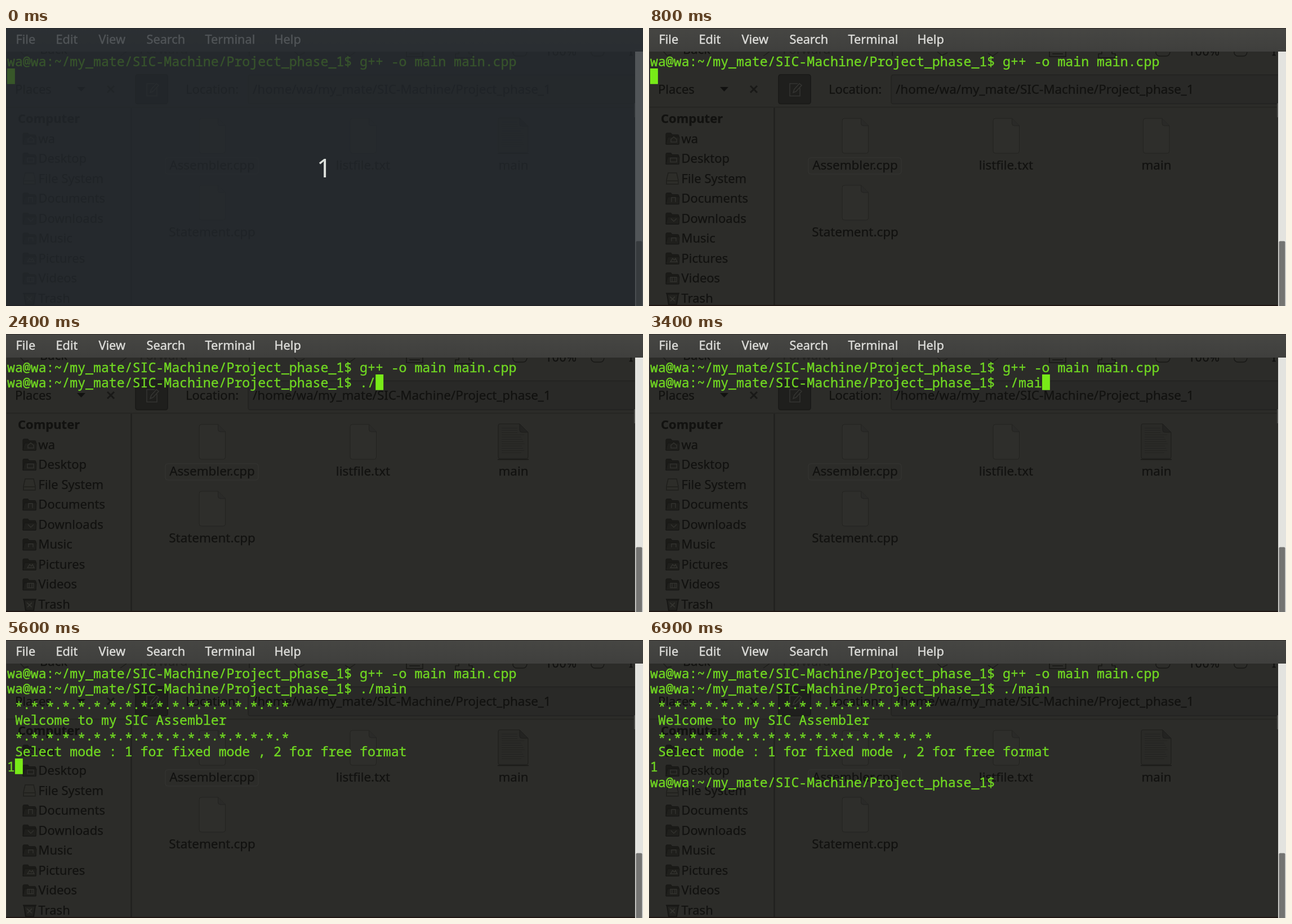
Recreate the animation shown at these times as an HTML page. Size 1131x495 px, loop 7 s.

```html
<!DOCTYPE html>
<html lang="en">
<head>
<meta charset="utf-8">
<title>Terminal session</title>
<style>
  html, body { margin: 0; width: 100%; height: 100%; overflow: hidden; background: #2c2c29; }
  svg { display: block; width: 1131px; height: 495px; }
  text { white-space: pre; font: 22px "Noto Sans", "Open Sans", sans-serif; }
  #files text { fill: #121210; stroke: #121210; stroke-width: .25px; }
  #files .bold { font-weight: 700; }
  #files .mid { text-anchor: middle; }
  #files .mid, #files .path { font-size: 22.4px; }
  #menu text { fill: #dededb; stroke: #dededb; stroke-width: .4px; font-size: 21.7px; }
  #term text { fill: #70d722; stroke: #70d722; stroke-width: .4px; font: 23.2px "Noto Sans Mono", "DejaVu Sans Mono", monospace; }
  #fade text { fill: #dde1dc; font-size: 46px; text-anchor: middle; }
</style>
</head>
<body>
<svg viewBox="0 0 1131 495">
  <defs>
    <linearGradient id="bar" x2="0" y2="1">
      <stop stop-color="#464643"/><stop offset="1" stop-color="#3f3f3d"/>
    </linearGradient>
    <g id="page">
      <path d="M.5 4q0-4 4-4H34L47 13V58q0 4-4 4H4.5q-4 0-4-4Z" fill="#2e2e2b" stroke="#232320"/>
      <path d="M34 0V9q0 4 4 4H47" fill="#2a2a28" stroke="#232320"/>
    </g>
    <g id="folder" stroke="#171715">
      <path d="M1 21V3q0-2 2-2H10l2 3H22q2 0 2 2V21Z" fill="#1b1b18"/>
      <path d="M1 21 4 8H25L24 21Z" fill="#1f1f1c"/>
    </g>
  </defs>
  <rect width="1131" height="495" fill="#2c2c29"/>
  <g id="files"></g>
  <g id="menu">
    <rect width="1131" height="42" fill="url(#bar)"/>
    <rect width="1131" height="1" fill="#2c2826"/>
  </g>
  <rect width="1" height="495" fill="#4b4a46" opacity=".6"/>
  <rect y="493" width="1117" height="2" fill="#1f1613"/>
  <rect x="1117" y="42" width="14" height="453" fill="#e3e3df"/>
  <rect x="1118.5" y="379.5" width="11" height="118" rx="2" fill="#747472"/>
  <g id="term"></g>
  <g id="fade">
    <rect width="1131" height="495" fill="#24292f" opacity=".76"/>
    <text x="565" y="266">1</text>
  </g>
</svg>
<script>
const LOOP = 7000, CELL = 13.92, ROW = 27.8, LEFT = 2;
const $ = id => document.getElementById(id);

function add(parent, tag, attrs, content = '') {
  const el = document.createElementNS('http://www.w3.org/2000/svg', tag);
  for (const key in attrs) el.setAttribute(key, attrs[key]);
  el.textContent = content;
  return parent.appendChild(el);
}
const files = $('files'), term = $('term');
const label = (x, y, s, cls = '') => add(files, 'text', { x, y, class: cls }, s);
const shape = (d, stroke, fill = 'none', width = 1.5) =>
  add(files, 'path', { d, stroke, fill, 'stroke-width': width });
const use = (id, x, y) => add(files, 'use', { href: '#' + id, x, y });

// Toolbar, mostly covered by the menu bar
shape('M24 40 32 49 40 47M203 50 214 42M432 40V50M512 42 520 49 530 44M602 45 610 50 620 43', '#1d1d1b');
shape('M711 38V51H740V38M716 46H735M804 38V46H798V53H828V46H822V38', '#171715');
shape('M900 40V45Q902 50 907 50H918Q924 50 925 43M1039 40V45Q1041 50 1046 50H1055Q1061 50 1062 43', '#181816');
label(60, 46, 'Back');
label(237, 46, 'Forward').setAttribute('opacity', '.4');
label(957, 49, '100%');
label(1106, 49, 'I');

// Panel edges and location bar
shape('M0 141H1117', '#242422');
shape('M222.5 142V493', '#222220', 'none', 3);
shape('M1117 83.5H434Q430 83.5 430 88V131Q430 135 434 135H1117', '#222220', '#292927');
shape('M234 83H283Q287 83 287 87V131Q287 135 283 135H234Q230 135 230 131V87Q230 83 234 83Z', '#191917', '#1f1f1d');
shape('M264 99H250V121H268V107M256 115 258 109 267 99 271 102 261 113Z', '#353532');
shape('M1116 134V159', '#4b4b48', 'none', 2);
label(16, 117, 'Places');
shape('M126 105H141L133.5 113Z', 'none', '#111110');
shape('M180 103 192 115M192 103 180 115', '#191917', 'none', 3);
label(319, 117, 'Location:');
label(438, 117, '/home/wa/my_mate/SIC-Machine/Project_phase_1', 'path');

// Sidebar
const glyphs = {
  wa: 'M10 17V12L15 8 20 12V17Z', Desktop: 'M9 10H20V17H9Z', Documents: 'M11 17V9H18V17',
  Downloads: 'M10 11 15 16 20 11', Music: 'M11 16V10H19V16', Pictures: 'M9 17 13 11 16 14 18 11 21 17Z',
  Videos: 'M9 9H20V17H9ZM12 9V17M17 9V17'
};
label(21, 169, 'Computer', 'bold');
['wa', 'Desktop', 'File System', 'Documents', 'Downloads', 'Music', 'Pictures', 'Videos', 'Trash'].forEach((name, i) => {
  const y = 186 + 35.55 * i;
  label(57.5, y + 18.5, name);
  if (glyphs[name]) {
    use('folder', 29, y);
    shape(glyphs[name], '#32322e').setAttribute('transform', `translate(29 ${y})`);
  } else if (name === 'Trash') {
    shape(`M32 ${y + 3}H52L49 ${y + 22}H35ZM30 ${y + 2}H54`, '#171715', '#22221f', 2);
    shape(`M37 ${y + 8} 46 ${y + 16}M46 ${y + 8} 38 ${y + 16}`, '#363632');
  } else {
    shape(`M34 ${y + 1}H49L52 ${y + 14}V${y + 21}H31V${y + 14}Z`, '#1f1f1c', '#2d2d29');
    shape(`M31 ${y + 15}H52`, '#1f1f1c');
  }
});

// File icons
shape('M287 231H444Q448 231 448 235V256Q448 260 444 260H287Q283 260 283 256V235Q283 231 287 231Z', '#353532', 'none', 1);
[['Assembler.cpp', 366, 161], ['listfile.txt', 634, 161], ['main', 901, 161], ['Statement.cpp', 366, 280]].forEach(([name, x, y]) => {
  label(x, y + 91, name, 'mid');
  if (name !== 'main') use('page', x - 23.5, y);
});
const plainMain = use('page', 877, 161);
const textMain = add(files, 'g', {});
add(textMain, 'path', { d: 'M874 163Q874 160 877 160H912L927 175V219Q927 222 924 222H877Q874 222 874 219Z', fill: '#2a2a27', stroke: '#1d1d1b' });
add(textMain, 'path', { d: 'M912 160V171Q912 175 916 175H927Z', fill: '#232321', stroke: '#1d1d1b' });
add(textMain, 'path', { d: 'M873 223.5H928', stroke: '#191917', 'stroke-width': 1.5 });
for (let i = 0; i < 12; i++)
  add(textMain, 'path', { d: `M880 ${167.5 + 4 * i}H${i < 3 ? 908 : 921 - i * 5 % 7}`, stroke: '#232321' });

[['File', 17], ['Edit', 88], ['View', 164], ['Search', 249], ['Terminal', 353], ['Help', 476]]
  .forEach(([s, x]) => add($('menu'), 'text', { x: x + .5, y: 28 }, s));

// Terminal
const line = (row, s, lift = 0) => add(term, 'text', { x: LEFT, y: 67.6 + ROW * row + lift }, s);
const prompt = 'wa@wa:~/my_mate/SIC-Machine/Project_phase_1$ ';
line(0, prompt + 'g++ -o main main.cpp');
const command = line(1, '');
const output = [
  line(2, ' ' + ' .'.repeat(17)), line(2, ' ' + '* '.repeat(18), 4),
  line(3, ' Welcome to my SIC Assembler'),
  line(4, ' ' + ' .'.repeat(17)), line(4, ' ' + '* '.repeat(18), 4),
  line(5, ' Select mode : 1 for fixed mode , 2 for free format')
];
const answer = line(6, '1'), lastPrompt = line(7, prompt);
const cursor = add(term, 'rect', { width: 13.9, height: 27.8, fill: '#78ea18' });

// time, typed command (null: no prompt yet), cursor row, cursor column, cursor lit
const steps = [
  [0, null, 1, 0, 1],
  [1000, '', 1, 45, 1],
  [1300, '.', 1, 46, 1],
  [1900, '.', 1, 46, 0],
  [2400, './', 1, 47, 1],
  [2900, './mai', 1, 50, 1],
  [3500, './main', 1, 51, 1],
  [3900, './main', 6, 0, 1],
  [4500, './main', 6, 0, 0],
  [5100, './main', 6, 0, 1],
  [5600, './main', 6, 1, 1],
  [5800, './main', 7, 0, 1],
  [6100, './main', 7, 45, 1],
  [6400, './main', 7, 45, 0]
];
const show = (el, on) => el.setAttribute('visibility', on ? 'visible' : 'hidden');

function draw(t) {
  const [, typed, row, col, lit] = steps.findLast(step => step[0] <= t);
  command.textContent = typed === null ? '' : prompt + typed;
  output.forEach(el => show(el, t >= 3900));
  show(answer, t >= 5600);
  show(lastPrompt, t >= 6100);
  cursor.setAttribute('x', LEFT + CELL * col);
  cursor.setAttribute('y', 44.2 + ROW * row);
  show(cursor, lit);
  const rebuilding = t >= 700 && t < 1100;
  show(plainMain, rebuilding);
  show(textMain, !rebuilding);
  $('fade').setAttribute('opacity', t < 100 ? 1 : t < 200 ? 0.45 : 0);
}

const start = performance.now();
function tick() {
  draw((performance.now() - start) % LOOP);
  requestAnimationFrame(tick);
}
tick();
</script>
</body>
</html>
```
